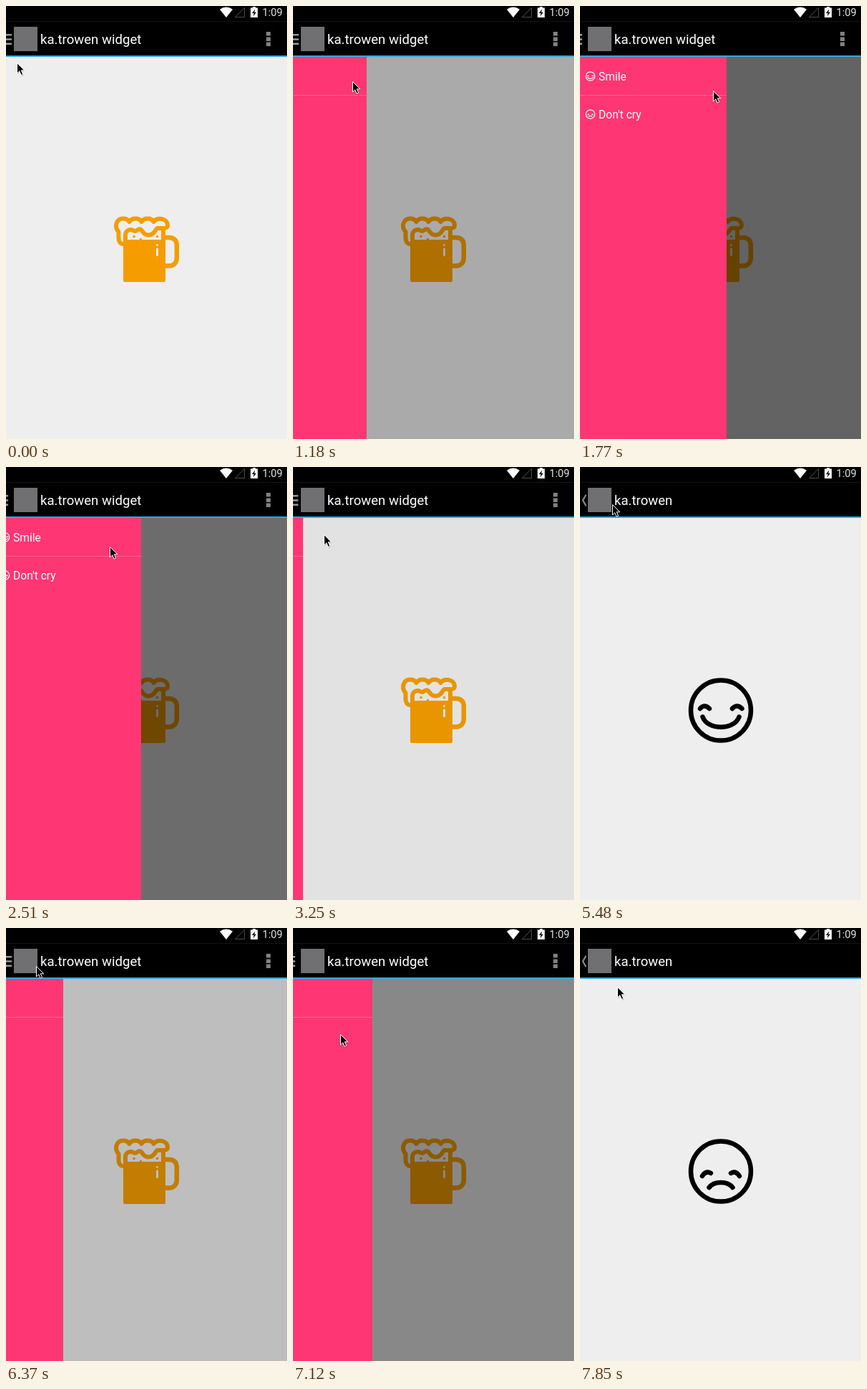
Animation, 393 px wide and 604 px high, one loop 8 s. Source, as an HTML page:

```html
<!DOCTYPE html>
<html lang="en">
<head>
<meta charset="utf-8">
<title>Drawer demo</title>
<style>
  html, body { margin: 0; width: 100%; height: 100%; overflow: hidden; background: #000; }
  svg { display: block; width: 100%; height: 100%; }
  text { font-family: Roboto, "Noto Sans", sans-serif; fill: #fff; }
  .title { font-size: 18.6px; }
  .item { font-size: 15.6px; }
  .line { fill: none; stroke-linecap: round; stroke-linejoin: round; }
  .icon { stroke: #fff; stroke-width: 8; }
</style>
</head>
<body>
<svg viewBox="0 0 393 604" xmlns="http://www.w3.org/2000/svg">
  <defs>
    <!-- faces are centred on 0,0 -->
    <g id="smile" class="line">
      <circle r="42"/>
      <path d="M-29 -2.5Q-23 -9.5 -16 -2.5M16 -2.5Q22.5 -9.5 29.5 -2.5M-25.5 9C-19 28 19 28 25.5 9"/>
    </g>
    <g id="sad" class="line">
      <circle r="42"/>
      <path d="M-26 6.5Q-21 -1.5 -14 2.5M14 2.5Q21 -1.5 26 6.5M-16.5 22.5C-9.5 13 9.5 13 16.5 22.5"/>
    </g>
    <g id="bar">
      <rect width="393" height="70" fill="#000"/>
      <rect y="21" width="393" height="1" fill="#141414"/>
      <rect y="69" width="393" height="2" fill="#2fa8d6"/>
    </g>
    <rect id="logo" x="11" y="29" width="33" height="34" fill="#707072"/>
  </defs>

  <g id="main">
    <rect width="393" height="604" fill="#eee"/>
    <g fill="#f59d00">
      <path d="M164 326H223V383Q223 385 221 385H166Q164 385 164 383Z"/>
      <path d="M177.5 320h3v3h-3zM187 324h3v3h-3zM210 320h3v3h-3z"/>
    </g>
    <g class="line" stroke="#f59d00" stroke-width="6">
      <path d="M167 332C159 333 157.5 328 157.5 323V315C151 308 154 296.5 164 296.5C168 296.5 171 298.5 172.5 301C176 295 186 295 189.5 301C193 295 203 295 206.5 301C212 294 226 296 226 306C226 310 223 310 220 310H212C209 310 208.500 319.500 199 319.500C192 319.500 191 313 188 311.500C185 310 183 314 180.500 314C178 314 177 311.500 174 312C170 312.500 167 315 167 319V328M220 310V328"/>
      <path stroke-width="6.5" d="M222 323H228C235 323 238.8 327 238.8 334V351C238.8 358 235 362.5 228 362.5H222"/>
    </g>
    <path class="line" stroke="#eee" stroke-width="3" d="M211.5 333.5V333.6M211.5 339V347.5"/>
    <rect id="scrim" width="393" height="604"/>
    <g id="drawer">
      <rect y="70" width="205" height="534" fill="#ff3674"/>
      <rect y="124" width="205" height="1" fill="#fff" opacity=".23"/>
      <use href="#smile" class="icon" transform="translate(14.5 98) scale(.148)"/>
      <text class="item" x="26" y="104">Smile</text>
      <use href="#sad" class="icon" transform="translate(14.5 151) scale(.148)"/>
      <text class="item" x="26" y="157">Don't cry</text>
    </g>
    <use href="#bar"/>
    <path id="menu" fill="#999" d="M0 39h8v2.5h-8zM0 45.3h8v2.5h-8zM0 51.5h8v2.5h-8z"/>
    <use href="#logo"/>
    <text class="title" x="48" y="53">ka.trowen widget</text>
    <path fill="#808080" d="M364 36h6v5.5h-6zM364 43.5h6v5.5h-6zM364 50.5h6v5.5h-6z"/>
  </g>

  <g id="page">
    <rect y="70" width="393" height="604" fill="#eee"/>
    <use href="#bar"/>
    <path class="line" stroke="#8a8a8a" stroke-width="2.2" d="M8 39.5L4 46.5L8 53.5"/>
    <use href="#logo"/>
    <text class="title" x="48" y="53">ka.trowen</text>
    <use id="face" transform="translate(197 339.5)" stroke="#000" stroke-width="6.5"/>
  </g>

  <rect id="press" y="22" height="47" fill="#33b5e5" opacity=".4"/>

  <rect width="393" height="21" fill="#000"/>
  <path fill="#fff" d="M308 16L299 4.800Q308 -2 317 4.800Z"/>
  <path fill="none" stroke="#4a4a4a" d="M333.5 2.5V15.5H320.5Z"/>
  <path fill="#fff" d="M345 1h4v1.5h3V16h-10V2.5h3z"/>
  <path d="M348.3 4.5L344 10h2.7L345.8 14.3L350 8.7h-2.7z"/>
  <text x="358.5" y="14" font-size="14.7" style="fill:#e4e4e4">1:09</text>

  <g id="cursor">
    <path transform="translate(1 1.5)" opacity=".2" d="M0 0V15L3.4 11.8L6 17.5L8.6 16.3L6 10.8H10.5Z"/>
    <path stroke="#fff" d="M.5 .5V15L3.8 11.8L6.2 17.3L8.7 16.2L6.3 10.8H10.8Z"/>
  </g>
</svg>

<script>
// The picture advances in even ticks; all times below are in ticks.
const LOOP = 8000, TICKS = 54, LEAD = 14, DRAWER = 205;
const HOME_TAPS = [25, 38];

const $ = id => document.getElementById(id);
const move = (id, x, y) => $(id).setAttribute("transform", `translate(${x} ${y})`);

const ramp = (t, from, to) => Math.min(1, Math.max(0, (t - from) / (to - from)));
const glide = (t, from) => 1 - (1 - ramp(t, from, from + 2.56)) ** 2;
const fade = (t, from) => ramp(t, from, from + 1.6);

// Swiped in and out, then opened by the home button and closed by an item, twice.
const drawerOpen = t =>
  ramp(t, 4, 12) - ramp(t, 15, 22.25) ** 2
  + glide(t, 25.44) - glide(t, 30.32)
  + glide(t, 42.44) - glide(t, 47.32);

const pageShown = t => fade(t, 31) - fade(t, 38) + fade(t, 48);
const mainLeft = t => glide(t, 30.32) - glide(t, 38) + glide(t, 47.32);

// Stops of the pointer: x, y, departure, arrival
const STOPS = [
  [15, 79, 0, 0], [6, 95, 0, 3], [186, 118, 5, 12], [43, 94, 15, 22], [38, 56, 22, 24],
  [42, 98, 26, 28], [45, 52, 35, 37], [42, 53, 38, 40], [66, 148, 43, 46], [52, 82, 50, 53]
];

function pointer(t) {
  let [x, y] = STOPS[0];
  for (const [toX, toY, from, to] of STOPS.slice(1)) {
    const k = ramp(t, from, to);
    x += (toX - x) * k;
    y += (toY - y) * k;
  }
  return [Math.round(x), Math.round(y)];
}

function draw(t) {
  move("cursor", ...pointer(t));

  const open = drawerOpen(t);
  const closing = open < drawerOpen(t - 1);
  const tuck = closing ? Math.min(1, open * 2) : Math.max(0, open - .5) * 2;
  move("drawer", Math.round((open - 1) * DRAWER), 0);
  move("menu", -5 * tuck, 0);

  // The scrim trails the drawer slightly; a leaving screen dims further.
  const light = (1 - .585 * drawerOpen(t - .07)) * (1 - .3 * mainLeft(t));
  $("scrim").setAttribute("opacity", 1 - light);

  const shown = pageShown(t);
  $("page").setAttribute("opacity", shown);
  move("page", 0, 36 * (1 - shown));
  $("face").setAttribute("href", t < 45 ? "#smile" : "#sad");
  $("press").setAttribute("width", !HOME_TAPS.includes(t) ? 0 : shown ? 137 : 197);
}

let last = -1;
function run() {
  const tick = Math.floor((performance.now() + LEAD) % LOOP / LOOP * TICKS);
  if (tick !== last) draw(last = tick);
  requestAnimationFrame(run);
}
run();
</script>
</body>
</html>
```
